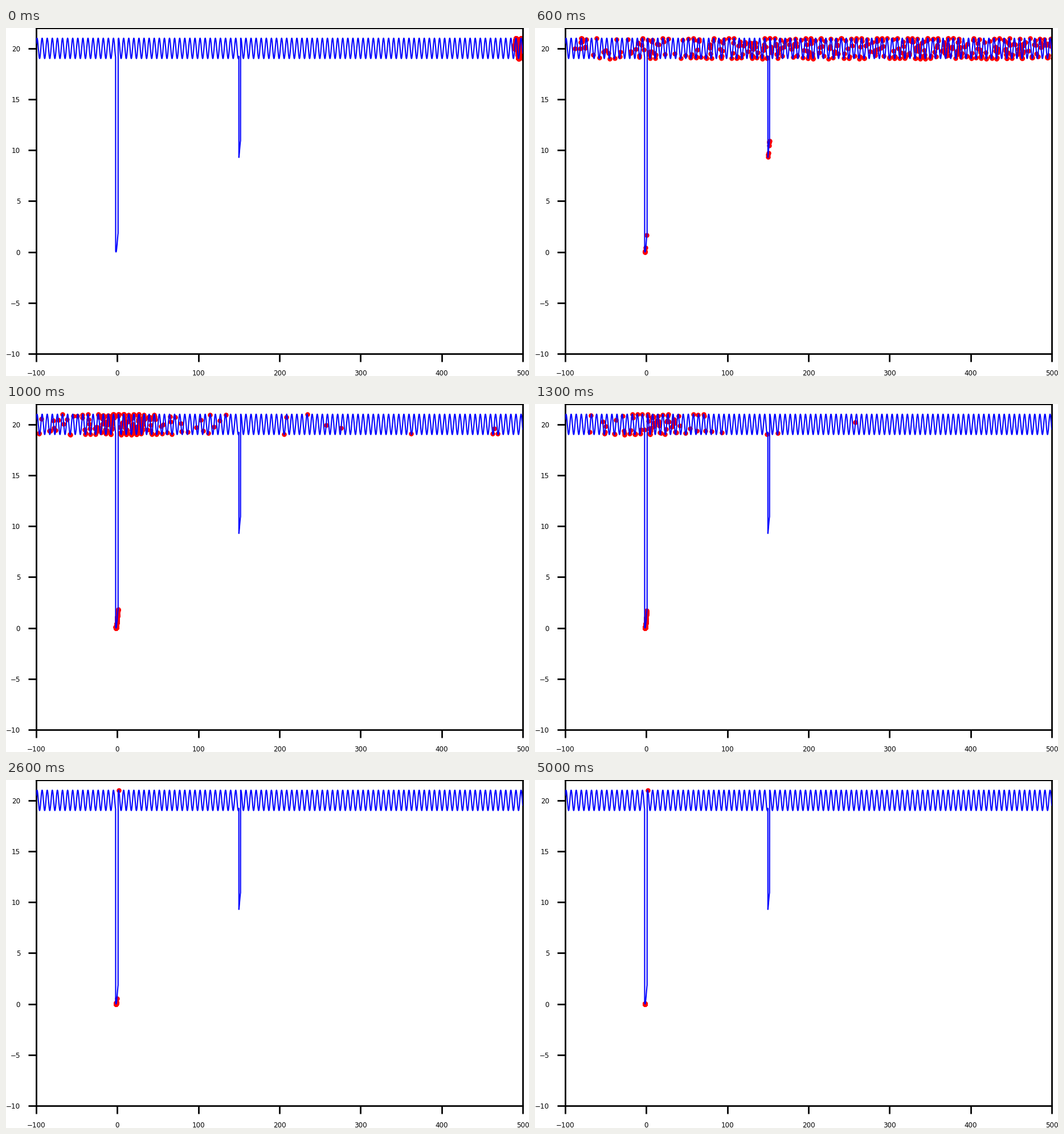
Animation, 918 px wide and 610 px high, one loop 5.1 s. Source, as a matplotlib script:

```python
import numpy as np
import matplotlib.pyplot as plt
from matplotlib.animation import FuncAnimation

W, H, DPI = 918, 610, 100
FRAMES, STEP = 51, 100
POP = 700
BEST = -np.pi / 2

plt.rcParams["font.family"] = "DejaVu Sans"


def cost(x):
    """Sine wave at 20 with a deep notch near 0 and a shallow one at 150."""
    base = np.where((x >= -2) & (x <= 1), 1, 20)
    base = np.where((x >= 150) & (x <= 152), 10, base)
    return base + np.sin(x)


def explorers(rng, k, share):
    """Start packed at the right edge, then diffuse to the left."""
    n = round(POP * share)
    if k == 0:
        return rng.uniform(490, 510, n)
    return rng.normal(500 - 20 * k, 110 * np.sqrt(k), n)


def halo(rng, k, share):
    """Offspring scattered around the deep notch, thinning out over time."""
    age = max(k - 10, 0)
    n = int(260 * (1 - share) * 0.7 ** age)
    return 8 + 20 * 0.93 ** age * rng.standard_cauchy(n)


def deep_notch(rng, k, share):
    """Winners that close in on the best point."""
    scale = max(0.3 * np.exp((18 - k) / 8), 0.03)
    x = BEST + scale * rng.standard_t(3, round(300 * (1 - share)))
    return x[(x >= -2) & (x <= 1)]


def shallow_notch(rng, k):
    n = round(8 * np.exp(-((k - 7) / 1.8) ** 2))
    return rng.uniform(150, 152, n)


def mutant(k):
    """Now and then one individual jumps to the crest beside the notch."""
    return [-BEST] if k % 24 == 2 else []


def population(k):
    rng = np.random.default_rng(40 + k)
    share = 1 / (1 + np.exp(2 * (k - 7.5)))
    return np.concatenate([explorers(rng, k, share), halo(rng, k, share),
                           deep_notch(rng, k, share), shallow_notch(rng, k),
                           mutant(k)])


fig = plt.figure(figsize=(W / DPI, H / DPI), dpi=DPI, facecolor="white")
ax = fig.add_axes([53 / W, 39 / H, 854 / W, 571 / H])
ax.set_xlim(-100, 500)
ax.set_ylim(-10, 22)
ax.set_xticks(range(-100, 501, 100))
ax.set_yticks(range(-10, 21, 5))
ax.tick_params(length=10, width=2, pad=10, labelsize=8.6)
for spine in ax.spines.values():
    spine.set_linewidth(2)

xs = np.arange(-1000, 5001) / 10
dots, = ax.plot([], [], "o", color="red", ms=6.1, mew=0, zorder=2)
ax.plot(xs, cost(xs), color="blue", lw=1.5, zorder=3)


def draw(k):
    x = population(k)
    dots.set_data(x, cost(x))
    return dots,


anim = FuncAnimation(fig, draw, frames=FRAMES, interval=STEP,
                     repeat=True, repeat_delay=0)
plt.show()
```
